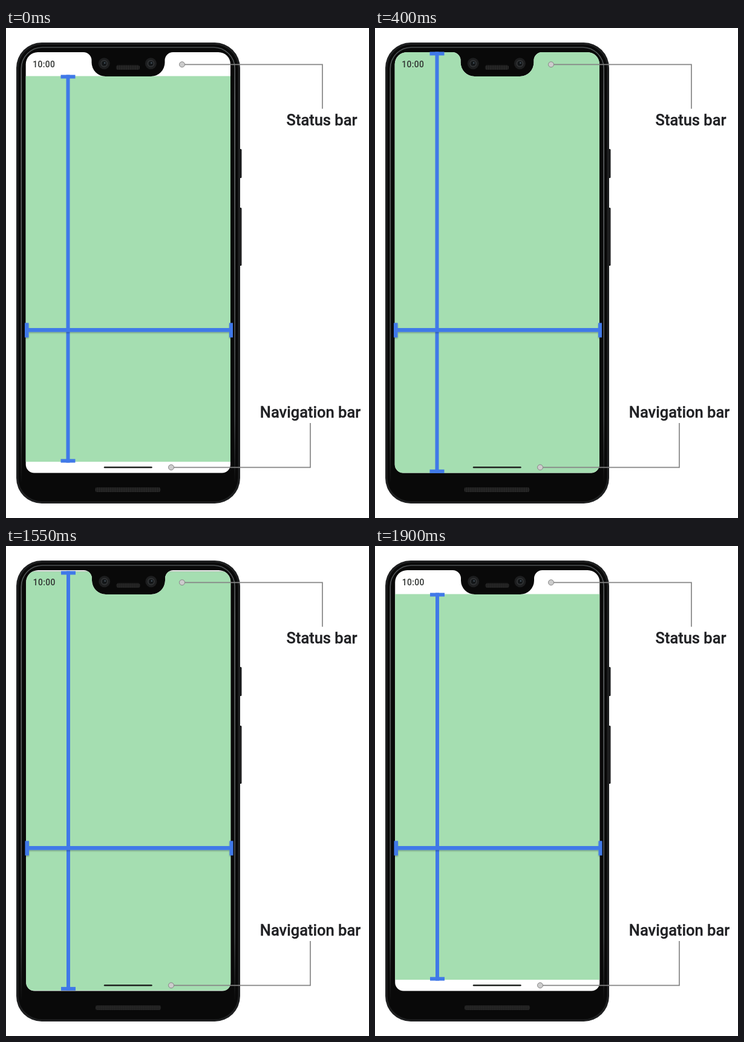
Recreate the animation shown at these times as an HTML page. Size 600x810 px, loop 2.6 s.

```html
<!DOCTYPE html>
<html lang="en">
<head>
<meta charset="utf-8">
<title>Edge-to-edge layout</title>
<style>
html, body { margin: 0; width: 100%; height: 100%; overflow: hidden; background: #fff; }
svg { display: block; width: 100%; height: 100%; }
text { font-family: Roboto, "Noto Sans", sans-serif; font-weight: 500; }
.label { font-size: 25.5px; fill: #202124; stroke: #202124; stroke-width: .35; text-anchor: middle; }
.clock { font-size: 13.8px; letter-spacing: .35px; fill: #303331; }
.lead path { fill: none; stroke: #858585; stroke-width: 1.7; }
.lead circle { fill: #ccc; stroke: #858585; stroke-width: 1; }
.blue { fill: #4079e8; }
</style>
</head>
<body>
<svg viewBox="0 0 600 810">
  <defs>
    <clipPath id="screenClip">
      <path d="M32.700 60A20 20 0 0 1 52.700 40H128A13.500 13.500 0 0 1 141.500 53.500V57A23 23 0 0 0 164.500 80H239.500A23 23 0 0 0 262.500 57V53.500A13.500 13.500 0 0 1 276 40H351A20 20 0 0 1 371 60V721.500A14 14 0 0 1 357 735.500H46.700A14 14 0 0 1 32.700 721.500Z"/>
    </clipPath>
    <pattern id="mesh" width="3" height="3" patternUnits="userSpaceOnUse">
      <rect width="3" height="3" fill="#191919"/>
      <circle cx="1.5" cy="1.5" r=".9" fill="#393939"/>
    </pattern>
    <linearGradient id="rim" gradientUnits="userSpaceOnUse" x1="0" y1="30" x2="0" y2="750">
      <stop offset="0" stop-color="#4c5052"/>
      <stop offset=".12" stop-color="#686c6e"/>
      <stop offset=".85" stop-color="#4c5052"/>
      <stop offset="1" stop-color="#0b0b0b"/>
    </linearGradient>
    <filter id="soft" x="-10%" y="-60%" width="120%" height="240%">
      <feDropShadow dx="0" dy="1.5" stdDeviation="1" flood-color="#000" flood-opacity=".3"/>
    </filter>
    <g id="lens">
      <circle r="9.5" fill="#1d1e1f"/>
      <circle r="6" fill="#303234"/>
      <circle r="4" fill="#121517"/>
      <circle cx="1" cy="-1" r="1.3" fill="#45525c"/>
    </g>
  </defs>
  <rect width="600" height="810" fill="#fff"/>
  <g fill="#18191a">
    <rect x="384" y="200" width="5.500" height="48" rx="1.5"/>
    <rect x="384" y="297" width="5.500" height="96" rx="1.5"/>
    <path d="M388.700 300V390" stroke="#3a3a3a" stroke-width=".8"/>
  </g>
  <rect x="17" y="24" width="370" height="762" rx="42" fill="#1e1f20"/>
  <rect x="20.500" y="27.500" width="363" height="755" rx="39" fill="#090909"/>
  <path d="M25.300 750V67A35 35 0 0 1 60.300 32H343.200A35 35 0 0 1 378.200 67V750" fill="none" stroke="url(#rim)" stroke-width="1.6"/>
  <g id="phone">
    <g clip-path="url(#screenClip)">
      <rect x="30" y="38" width="345" height="700" fill="#fff"/>
      <rect id="content" x="32" width="340" fill="#a5deb1"/>
      <path id="edge" d="M32 0H372" stroke="#a9b9ad" stroke-width="1"/>
    </g>
    <use href="#lens" x="162.200" y="58.800"/>
    <use href="#lens" x="239.400" y="58.800"/>
    <rect x="182" y="61.500" width="39" height="7.500" rx="3" fill="url(#mesh)"/>
    <rect x="147.500" y="759.500" width="108" height="7.500" rx="3" fill="url(#mesh)"/>
    <text class="clock" x="44.300" y="65">10:00</text>
    <g class="blue">
      <rect id="stem" x="99.500" width="6"/>
      <rect id="capTop" x="90.500" width="24" height="6"/>
      <rect id="capBottom" x="90.500" width="24" height="6"/>
    </g>
    <path class="blue" filter="url(#soft)" d="M31 487.500H37.500V496H369V487.500H375V511.500H369V502.500H37.500V511.500H31Z"/>
  </g>
  <path d="M163 726.300H240.500" stroke="#202320" stroke-width="2.4" stroke-linecap="round"/>
  <g class="lead">
    <path d="M291 60.300H523V133.500"/>
    <circle cx="291" cy="60.300" r="4.500"/>
    <path d="M273 726.300H503V653"/>
    <circle cx="273" cy="726.300" r="4.500"/>
  </g>
  <text class="label" x="522" y="161">Status bar</text>
  <text class="label" x="503" y="644">Navigation bar</text>
</svg>
<script>
const LOOP = 2600, STEP = 50, START = 40, SPAN = 442;
const $ = id => document.getElementById(id);
const set = (id, attrs) => {
  for (const key in attrs) $(id).setAttribute(key, attrs[key]);
};
const mix = (a, b, k) => a + (b - a) * k;
const ease = x => x < .5 ? 8 * x ** 4 : 1 - 8 * (1 - x) ** 4;

function draw(ms) {
  const t = Math.floor((ms % LOOP) / STEP) * STEP;
  const late = t >= 1300;
  // The way back mirrors the way out.
  const local = late ? 1900 - t : t;
  const k = ease(Math.min(1, Math.max(0, (local - START) / SPAN)));
  const top = mix(79.5, 39.5, k), bottom = mix(717, 736, k);
  const capTop = mix(77.5, 39, k), capBottom = mix(712.5, 730, k);

  set("content", { y: top, height: bottom - top });
  set("edge", { transform: `translate(0 ${top})`, opacity: k > .02 && k < .98 ? 1 : 0 });
  set("stem", { y: capTop, height: capBottom + 6 - capTop });
  set("capTop", { y: capTop });
  set("capBottom", { y: capBottom });
  set("phone", { transform: `translate(${late ? .5 : 0} 0)` });
}

const began = performance.now();
function tick() {
  draw(performance.now() - began);
  requestAnimationFrame(tick);
}
draw(0);
requestAnimationFrame(tick);
</script>
</body>
</html>
```
